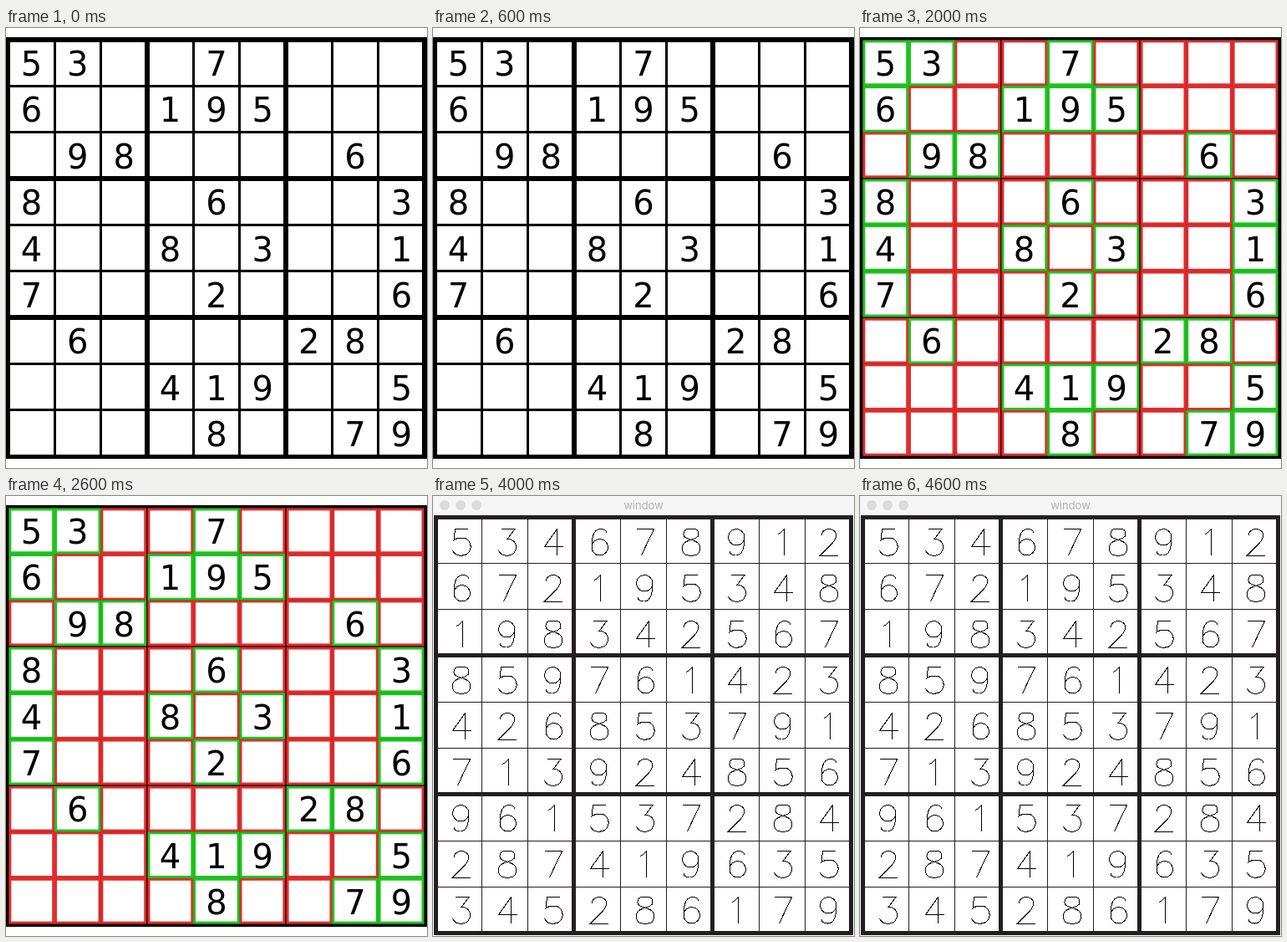
Write an HTML page that moves like this. It is 504x526 px and loops after 5000 ms.

```html
<!DOCTYPE html>
<html lang="en">
<head>
<meta charset="utf-8">
<title>Sudoku solver</title>
<style>
  html, body { margin: 0; width: 100%; height: 100%; overflow: hidden; background: #fff; }
  svg { display: block; width: 504px; height: 526px; }
  .digit { font: 40px "DejaVu Sans", sans-serif; text-anchor: middle; }
  .box { fill: none; stroke-width: 3; }
  .mono { font-family: "DejaVu Sans Mono", monospace; fill: #dedede; stroke: #dedede; stroke-width: .9; filter: blur(.8px); }
  .title { font: 13px Inter, sans-serif; fill: #b1b1b1; text-anchor: middle; }
  .plotter { fill: none; stroke: #000; vector-effect: non-scaling-stroke; shape-rendering: crispEdges; }
</style>
</head>
<body>
<svg id="stage" viewBox="0 0 504 526"></svg>
<script>
const HOLD = 1000, SCENES = 5, LOOP = HOLD * SCENES;
const GREEN = '#1fc41f', RED = '#e12d2d', INK = '#231f20';

const solution = ['534678912', '672195348', '198342567', '859761423', '426853791',
  '713924856', '961537284', '287419635', '345286179'];
// Columns of the givens in the upper rows; the lower rows are the same turned by 180 degrees
const upper = ['014', '0345', '127', '048', '0358'];
const isGiven = (r, c) => r < 5 ? upper[r].includes(c) : isGiven(8 - r, 8 - c);

const eachCell = draw =>
  solution.map((row, r) => [...row].map((ch, c) => draw(ch, r, c)).join('')).join('');
const puzzle = solution.map((row, r) =>
  [...row].map((ch, c) => isGiven(r, c) ? ch : 'X').join(''));

const rect = (x, y, w, h, attrs = '') =>
  `<rect x="${x}" y="${y}" width="${w}" height="${h}" ${attrs}/>`;

// Nine by nine ruling with heavier lines round each block
function ruling(x, y, pitch, thin, thick, color) {
  const half = thick / 2, len = pitch * 9 + thick;
  const attrs = `fill="${color}" shape-rendering="crispEdges"`;
  let out = '';
  for (let i = 0; i < 10; i++) {
    const w = i % 3 ? thin : thick, at = i * pitch - w / 2;
    out += rect(x + at, y - half, w, len, attrs) + rect(x - half, y + at, len, w, attrs);
  }
  return out;
}

// Printed puzzle and the boxes found in it
const LEFT = 2.7, TOP = 13.8, PITCH = 55.38;
const givens = eachCell((ch, r, c) => isGiven(r, c) ?
  `<text class="digit" x="${LEFT + (c + .5) * PITCH}" y="${57 + r * PITCH}">${ch}</text>` : '');
const printed = ruling(LEFT, TOP, PITCH, 3, 5.4, '#000') + givens;

const inset = i => i % 3 ? 1.4 : 2.1;
const start = i => i * PITCH + inset(i);
const span = i => PITCH - inset(i) - inset(i + 1);
const box = (r, c, color) => rect(LEFT + start(c), TOP + start(r), span(c), span(r),
  `class="box" stroke="${color}"`);
const filled = eachCell((ch, r, c) => isGiven(r, c) ? box(r, c, GREEN) : '');
const empty = eachCell((ch, r, c) => isGiven(r, c) ? '' : box(r, c, RED));

// Text grids
function listing(id, rows, [x, y, w, h], tx, ty, size, step) {
  const lines = rows.map((row, i) =>
    `<text class="mono" x="${tx}" y="${ty + i * step}" font-size="${size}">${row}</text>`).join('');
  return `<clipPath id="${id}">${rect(x, y, w, h)}</clipPath>
    <g clip-path="url(#${id})">${rect(x, y, w, h)}${lines}</g>`;
}
const arrow = '<path d="M161 256H283L277 236.5L332 260L277 283.5L283 264H161Z"/>';
const listings = arrow +
  listing('before', puzzle.slice(0, 8), [13, 124, 144, 284], 14.5, 152, 25.6, 34.6) +
  listing('after', solution, [342, 117, 145, 299], 345.5, 138.5, 26.7, 36.4);

// Single-stroke digits, 21 units tall, y up from the baseline
const bowl = 'A6 6.5 0 0 0 11 0H8Q5 0 3 4';
const loop = 'M16 14.5a6.5 6.5 0 0 1-13 0a6.5 6.5 0 0 1 13 0Q16 0 9 0Q5 0 4 3';
const strokes = {
  1: 'M6 17L8 18L11 21V0',
  2: 'M4 16A6 5 0 0 0 16 16Q16 14 13 10L3 0H17',
  3: 'M5 21H16L10 13H11' + bowl,
  4: 'M13 0V21L3 7H18',
  5: 'M15 21H5L4 12Q6 14 11 14' + bowl,
  6: loop,
  7: 'M3 21H17L7 0',
  8: 'M8 21Q4 21 4 17C4 11 17 14 17 6Q17 0 12 0H8Q3 0 3 6C3 14 16 11 16 17Q16 21 12 21Z',
  9: loop
};
const plotted = eachCell((ch, r, c) => {
  const turn = ch === '6' ? 'rotate(180 10 10.5)' : '';
  return `<path class="plotter" d="${strokes[ch]}"
    transform="translate(${19 + c * 55} ${71 + r * 55}) scale(1.5 -1.5) ${turn}"/>`;
});
const buttons = [0, 1, 2].map(i => `<circle cx="${14 + i * 19}" cy="11" r="6" fill="#dcdcdc"/>`).join('');
const titleBar = rect(0, 0, 504, 22, 'fill="#f6f6f6"') + buttons +
  '<text class="title" x="252" y="16">window</text>';
const solved = titleBar + ruling(3, 25, 55.33, 1, 5, INK) + plotted;

const scenes = [printed, printed + filled, printed + empty + filled, listings, solved];
const stage = document.getElementById('stage');
stage.innerHTML = scenes.map(s => `<g opacity="0">${s}</g>`).join('');

// Each scene shows for one fifth of the loop, with hard cuts
const steps = [[1, 0], [1, 1 / SCENES], [0, 1 / SCENES], [0, 1]]
  .map(([opacity, offset]) => ({ opacity, offset }));
[...stage.children].forEach((scene, i) =>
  scene.animate(steps, { duration: LOOP, iterations: Infinity, delay: i * HOLD - LOOP }));
</script>
</body>
</html>
```
